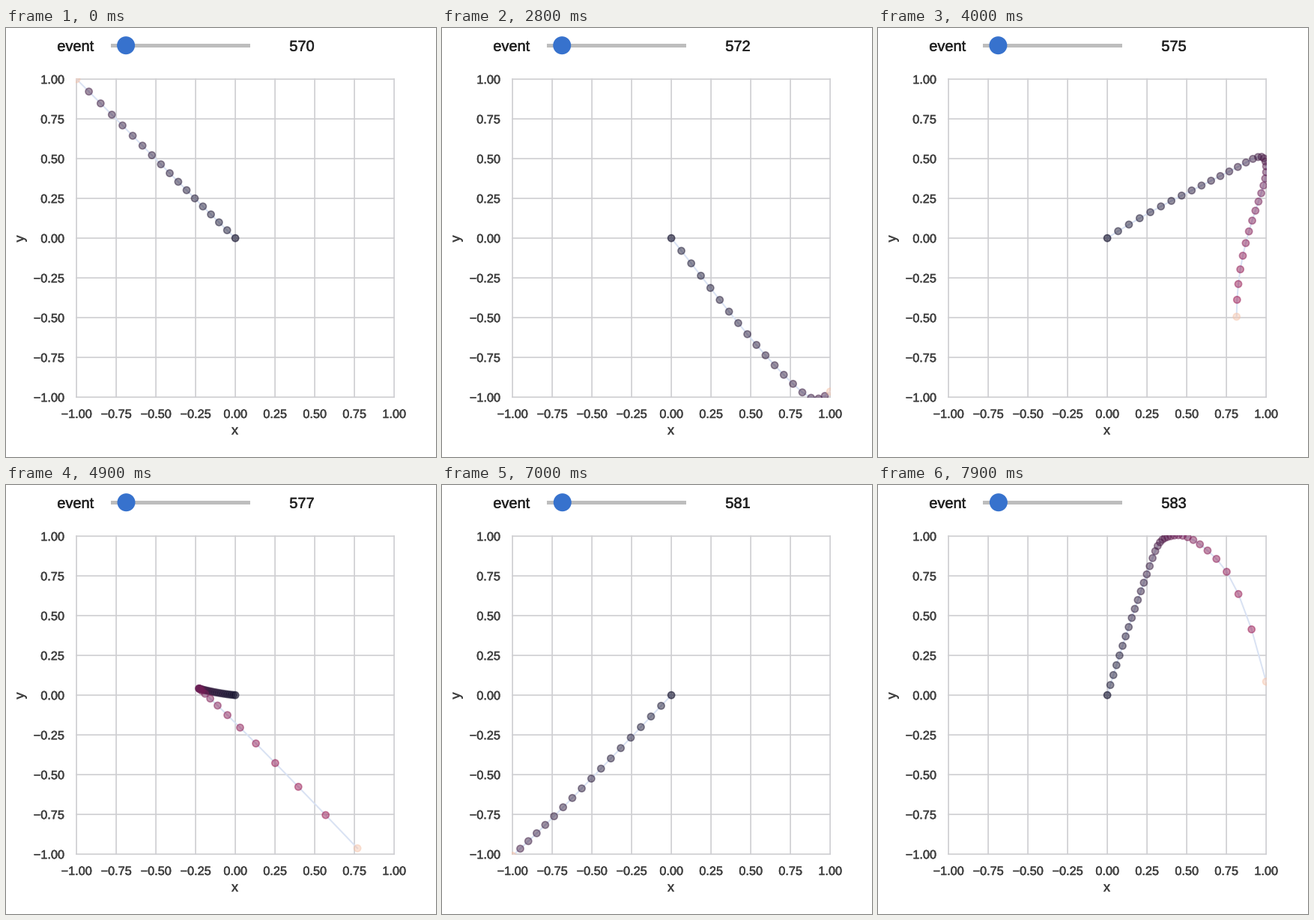
Recreate the animation shown at these times as a matplotlib script. Size 574 by 572 pixels, loop 8 s.

```python
import numpy as np
import matplotlib.pyplot as plt
from matplotlib.animation import FuncAnimation
from matplotlib.colors import LinearSegmentedColormap
from matplotlib.patches import Circle, Rectangle
from matplotlib.patheffects import withStroke

W, H, DPI = 574, 572, 100
FRAMES, INTERVAL = 80, 100
PT = 72 / DPI
LEFT, TOP, SIDE = 94.1, 68.2, 424
FIRST_EVENT, LAST_EVENT = 570, 583

plt.rcParams["font.family"] = "Liberation Sans"
cmap = LinearSegmentedColormap.from_list(
    "heat", ["#14122e", "#35193e", "#701f57", "#98124e"])


def fly(velocity, *legs):
    """Path from the centre; each leg is (steps, end point, end velocity)."""
    p, v = np.zeros(2), np.array(velocity)
    points = [p]
    for n, end, end_v in legs:
        q, w = np.array(end), np.array(end_v)
        for t in np.arange(1, n + 1) / n:
            u = 1 - t
            points.append(u**3 * p + 3 * u * u * t * (p + v * n / 3)
                          + 3 * u * t * t * (q - w * n / 3) + t**3 * q)
        p, v = q, w
    return np.array(points)


def straight(degrees, steps=18):
    """Even flight from the centre to the edge of the square."""
    a = np.radians(degrees)
    d = np.array([np.cos(a), np.sin(a)])
    d /= np.abs(d).max()
    return fly(d / steps, (steps, d, d / steps))


tracks = {
    570: fly((-.052, .05), (17, (-1, 1), (-.08, .08))),
    571: straight(40),
    572: fly((.064, -.08), (14, (.825, -.97), (.059, -.052)),
             (4, (1, -.965), (.03, .03))),
    573: straight(-45),
    574: straight(-30),
    575: fly((.068, .045), (14, (.873, .476), (.05, .028)),
             (6, (1, .452), (.003, -.035)), (14, (.814, -.494), (0, -.11))),
    576: straight(-70),
    577: fly((-.012, .001), (22, (-.229, .042), (-.002, .001)),
             (13, (.769, -.963), (.215, -.225))),
    578: straight(145),
    579: straight(245),
    580: straight(225),
    581: fly((-.064, -.067), (17, (-1, -1.01), (-.048, -.043))),
    582: straight(-45),
    583: fly((.019, .064), (15, (.285, .862), (.018, .05)),
             (7, (.4, 1), (.022, .005)), (8, (.687, .857), (.06, -.06)),
             (4, (1, .085), (.096, -.39))),
}

starts = np.round(21 + 4.57 * np.arange(LAST_EVENT - FIRST_EVENT))

fig = plt.figure(figsize=(W / DPI, H / DPI), dpi=DPI, facecolor="white")
ax = fig.add_axes([0, 0, 1, 1])
ax.set(xlim=(0, W), ylim=(H, 0))
ax.axis("off")


def to_px(points):
    return (LEFT, TOP) + (1 + points * (1, -1)) * SIDE / 2


def label(x, y, s, px, color="#404040", **kw):
    return ax.text(x, y, s, fontsize=px * PT, color=color,
                   path_effects=[withStroke(linewidth=0.35, foreground=color)], **kw)


def draw_grid():
    style = dict(color="#cfcfd2", lw=1.7 * PT, snap=False,
                 solid_capstyle="projecting", zorder=1)
    for i in range(9):
        p = i * SIDE / 8
        ax.plot([LEFT + p] * 2, [TOP, TOP + SIDE], **style)
        ax.plot([LEFT, LEFT + SIDE], [TOP + p] * 2, **style)
        s = f"{i / 4 - 1:.2f}".replace("-", "\u2212")
        label(LEFT + p, 520, s, 16.3, ha="center")
        label(77.8, TOP + SIDE - p + 6, s, 16.3, ha="right")
    label(305.5, 542, "x", 18, ha="center")
    label(19.5, 281, "y", 18, ha="center", va="center", rotation=90)


def draw_slider():
    label(68.3, 30.7, "event", 20, "#222222")
    ax.add_patch(Rectangle((140, 20.5), 186, 5.2, fc="#bdbdbd", ec="none"))
    return ax.add_patch(Circle((160, 23.2), 12, fc="#3772cd", ec="none", zorder=5))


draw_grid()
knob = draw_slider()
counter = label(395, 30.7, "", 20, "#222222", ha="center")

clip = Rectangle((LEFT - 0.8, TOP - 0.8), SIDE + 1.6, SIDE + 1.6,
                 transform=ax.transData)
path, = ax.plot([], [], color="#d9e2f3", lw=2 * PT, zorder=2)
dots = ax.scatter([], [], s=(9.2 * PT) ** 2, linewidths=1.6 * PT, zorder=3)
for artist in (path, dots):
    artist.set_clip_path(clip)


def dot_colors(n):
    rgba = cmap((np.arange(n) / 33) ** 1.3)
    rgba[:, 3] = 0.48
    rgba[0, 3] = 0.6
    rgba[-1] = (0.96, 0.76, 0.66, 0.45)
    return rgba


def event_at(frame):
    return FIRST_EVENT + int(np.sum(starts <= frame))


def update(frame):
    event = event_at(frame)
    counter.set_text(str(event))
    knob.set_center((160.1 + 0.06 * (event - FIRST_EVENT), 23.2))
    # The plot follows the counter one step later.
    points = to_px(tracks[event_at(frame - 1)])
    colors = dot_colors(len(points))
    path.set_data(*points.T)
    dots.set_offsets(points)
    dots.set_facecolor(colors)
    dots.set_edgecolor(colors)
    return counter, knob, path, dots


anim = FuncAnimation(fig, update, frames=FRAMES, interval=INTERVAL,
                     repeat=True, repeat_delay=0, blit=False)
plt.show()
```
